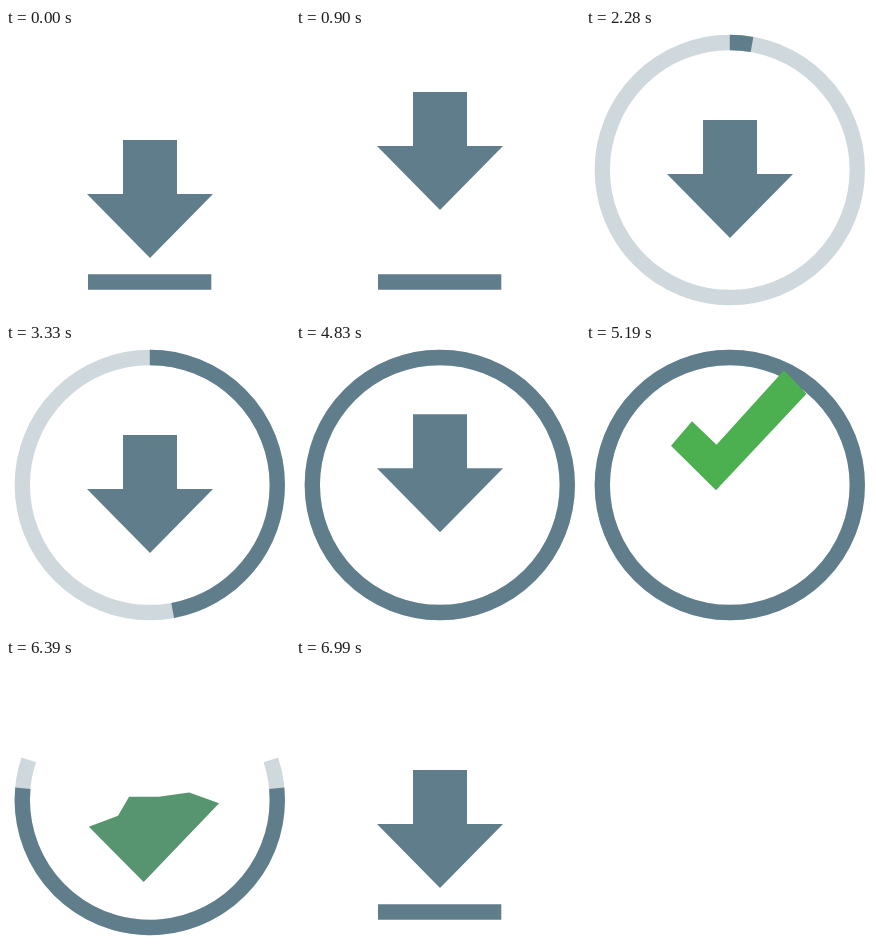
Write an HTML page with a canvas that moves like this. It is 284 px wide and 287 px high and loops after 7350 ms.

```html
<!DOCTYPE html>
<html>
<head>
<meta charset="utf-8">
<style>
html, body { margin: 0; width: 100%; height: 100%; overflow: hidden; background: #fff; }
canvas { display: block; }
</style>
</head>
<body>
<canvas id="stage" width="284" height="287"></canvas>
<script>
const ctx = document.getElementById('stage').getContext('2d');
const LOOP = 7350, CX = 143.8, CY = 142, R = 127.5, HALF = 30;
const SLATE = [96, 125, 139], GREEN = [76, 175, 80];
const DARK = `rgb(${SLATE})`, LIGHT = '#cfd8dc';

const linear = u => u;
const easeIn = u => u * u;
const easeOut = u => u * (2 - u);
const easeBoth = u => 0.5 - 0.5 * Math.cos(Math.PI * u);
const mix = (a, b, u) => a + (b - a) * u;

// Keys are [time, value, easing towards this key].
function track(t, keys) {
  if (t <= keys[0][0]) return keys[0][1];
  for (let i = 1; i < keys.length; i++) {
    const [t0, v0] = keys[i - 1], [t1, v1, ease = linear] = keys[i];
    if (t < t1) return mix(v0, v1, ease((t - t0) / (t1 - t0)));
  }
  return keys[keys.length - 1][1];
}

// Points are relative to the arrow's top edge; both shapes share their order.
const ARROW = [[117, 0], [171, 0], [171, 54], [207, 54], [144, 118], [81, 54], [117, 54]];
const CHECK = [[130.5, 72.5], [130.5, 72.5], [198, -2], [220.5, 21.5], [130, 118], [85, 73.5], [106, 49]];

const TOP = [
  [450, 112], [850, 62, easeOut], [1170, 144, easeIn], [1400, 80, easeOut], [1690, 92, easeBoth],
  [4590, 92], [4735, 62, easeOut], [5020, 144, easeIn], [5175, 28, easeOut], [5370, 98.5, easeBoth],
  [6200, 98.5], [6560, 112, easeBoth]
];
const MORPH = [[4970, 0], [5110, 1, easeBoth], [6200, 1], [6560, 0, easeBoth]];
const SAG = [
  [1125, 0], [1160, 15.5], [6570, 15.5], [6690, -18, easeBoth],
  [6810, 8, easeBoth], [6910, -3, easeBoth], [6990, 0, easeBoth]
];

// Angles in degrees, counter-clockwise from the bottom of the ring.
function arc(from, to, color) {
  if (to <= from) return;
  const rad = a => (90 - a) * Math.PI / 180;
  ctx.strokeStyle = color;
  ctx.beginPath();
  ctx.arc(CX, CY, R, rad(to), rad(from));
  ctx.stroke();
}

function bar(sag) {
  ctx.strokeStyle = DARK;
  ctx.beginPath();
  ctx.moveTo(82, 254);
  ctx.quadraticCurveTo(CX, 254 + 2 * sag, 205.3, 254);
  ctx.stroke();
}

function ring(t) {
  if (t < 2215) {
    const slide = [1160, 2215];
    const end = from => track(t, [[slide[0], from], [slide[1], 180, easeIn]]);
    const left = track(t, [[1600, HALF], [2215, 180]]);
    arc(-left, end(HALF), LIGHT);
    arc(end(-HALF), end(HALF), DARK);
  } else if (t < 5850) {
    const done = track(t, [[2215, 0], [4583, 360]]);
    arc(-180, 180, LIGHT);
    arc(180 - done, 180, DARK);
  } else {
    const light = track(t, [[5990, 180], [6570, HALF, easeIn]]);
    const dark = track(t, [[5850, 180], [6570, HALF, easeIn]]);
    arc(-light, light, LIGHT);
    arc(-dark, dark, DARK);
  }
}

function icon(t) {
  const top = track(t, TOP), m = track(t, MORPH);
  ctx.fillStyle = `rgb(${SLATE.map((c, i) => Math.round(mix(c, GREEN[i], m)))})`;
  ctx.beginPath();
  ARROW.forEach(([x, y], i) => {
    ctx.lineTo(mix(x, CHECK[i][0], m), top + mix(y, CHECK[i][1], m));
  });
  ctx.fill();
}

function draw() {
  const t = performance.now() % LOOP;
  ctx.fillStyle = '#fff';
  ctx.fillRect(0, 0, 284, 287);
  ctx.lineWidth = 15.3;
  if (t < 1160 || t >= 6570) bar(track(t, SAG));
  else ring(t);
  icon(t);
  requestAnimationFrame(draw);
}
draw();
</script>
</body>
</html>
```
